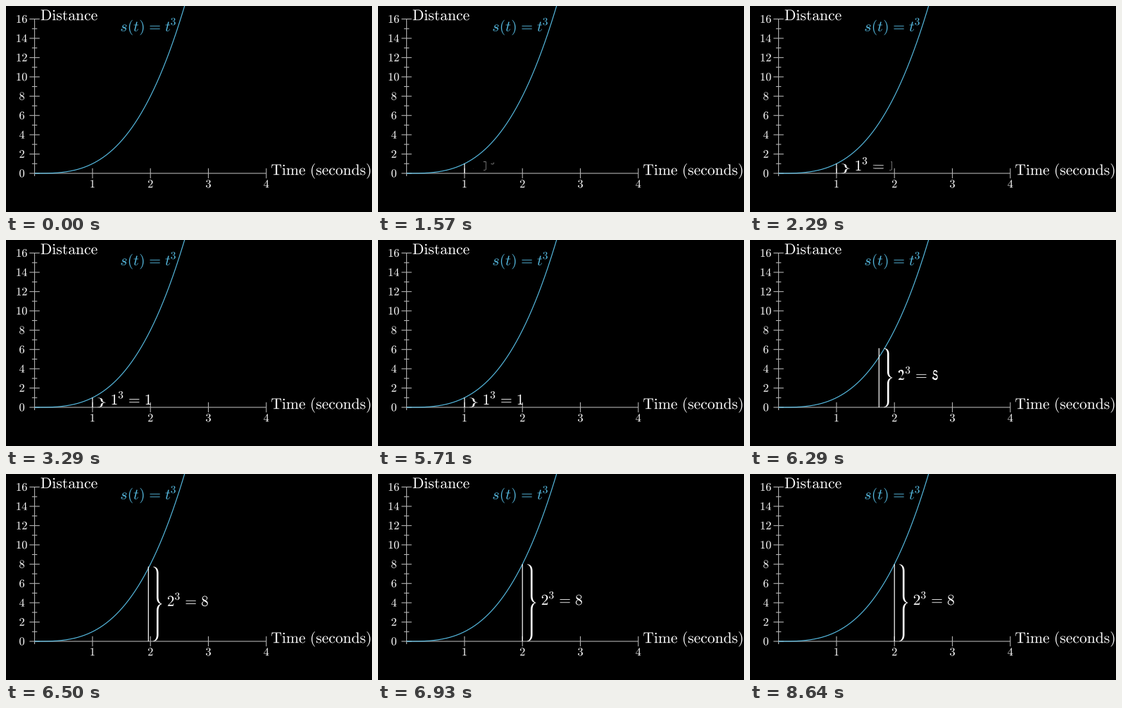
A matplotlib script that plays this animation: 520 by 293 pixels, repeating every 10 s.

```python
import matplotlib.pyplot as plt
import numpy as np
from matplotlib.animation import FuncAnimation
from matplotlib.patches import PathPatch
from matplotlib.path import Path
from matplotlib.textpath import TextPath

plt.rcParams["mathtext.fontset"] = "cm"

W, H, DPI = 520, 293, 100
FRAMES, LOOP = 140, 10000
UNIT = 36.58                       # pixels per scene unit
X0, Y0 = 40.6, 238.0               # graph origin
DX, DY = 2.25 * UNIT, 6 / 16 * UNIT
EM, SMALL = 21.6, 16.4             # text sizes in pixels
WHITE, GREY, BLUE = "#ffffff", "#b4b4b4", "#55b8de"
GROW, WRITE, MOVE = 0.286, 1.286, 5.686   # start times in seconds

fig = plt.figure(figsize=(W / DPI, H / DPI), dpi=DPI, facecolor="black")
ax = fig.add_axes([0, 0, 1, 1])
ax.set(xlim=(0, W), ylim=(H, 0))
ax.axis("off")


def gx(t):
    return X0 + DX * t


def gy(s):
    return Y0 - DY * s


def lerp(a, b, u):
    return a + (b - a) * u


def smooth(u):
    """Sigmoid easing, clamped to 0..1."""
    u = np.clip(u, 0, 1)
    e = 1 / (1 + np.exp(5))
    s = 1 / (1 + np.exp(-10 * (u - 0.5)))
    return float(np.clip((s - e) / (1 - 2 * e), 0, 1))


def stroke(xs, ys, color, width=1.1, z=1):
    line, = ax.plot(xs, ys, color=color, lw=width * 72 / DPI, zorder=z,
                    solid_capstyle="butt", snap=False)
    return line


def outline(tex):
    """Glyph contours in em units, y down, starting at the left ink edge."""
    polys = TextPath((0, 0), f"${tex}$", size=200).to_polygons()
    left = min(p[:, 0].min() for p in polys)
    return [(p - [left, 0]) * [1 / 200, -1 / 200] for p in polys]


def compound(polys):
    return Path.make_compound_path(*[Path(p) for p in polys])


def patch(polys, color, z=3, **kw):
    style = dict(fc=color, ec="none", lw=0, snap=False, zorder=z)
    style.update(kw)
    return ax.add_patch(PathPatch(compound(polys), **style))


def text(tex, x, y, size=EM, color=WHITE, center=False):
    polys = outline(tex)
    if center:
        x -= max(p[:, 0].max() for p in polys) * size / 2
    patch([p * size + [x, y] for p in polys], color)


# Axes
stroke([X0, gx(4)], [Y0, Y0], GREY)
stroke([X0, X0], [Y0 + 4, gy(16)], GREY)
for s in range(17):
    r = 3.7 if s % 2 else 7.2
    stroke([X0 - r, X0 + r], [gy(s)] * 2, GREY)
    if s % 2 == 0:
        text(rf"\mathrm{{{s}}}", 22.6, gy(s) + 5.3, SMALL, center=True)
for t in range(1, 5):
    stroke([gx(t)] * 2, [Y0 - 7.2, Y0 + 7.2], GREY)
    text(rf"\mathrm{{{t}}}", gx(t), 258.3, SMALL, center=True)
text(r"\mathrm{Distance}", 49.6, 20.3)
text(r"\mathrm{Time\ (seconds)}", 377.2, 240.2)

# Curve and its formula
ts = np.linspace(0, 2.7, 300)
stroke(gx(ts), gy(ts ** 3), BLUE, 1.2, z=2)
for tex, x in [("s", 163.5), ("(", 174.8), ("t", 181.5), (")", 190.4),
               ("=", 204.4), ("t", 226.5)]:
    text(tex, x, 36, color=BLUE)
text("3", 234.4, 36 - 0.413 * EM, 0.71 * EM, BLUE)


def bezier(a, b, c, d, n=16):
    u = np.linspace(0, 1, n)[:, None]
    a, b, c, d = map(np.array, (a, b, c, d))
    return ((1 - u) ** 3 * a + 3 * u * (1 - u) ** 2 * b
            + 3 * u * u * (1 - u) * c + u ** 3 * d)


def brace(height, hook):
    """Right-pointing brace centred on y = 0, x from 0 to 12."""
    top, k, n = -height / 2, hook / 10, -hook
    outer = np.vstack([
        bezier((0, top), (4.5, top + 0.4 * k), (7.3, top + hook * 0.35),
               (7.3, top + hook)),
        bezier((7.3, n), (7.3, n * 0.5), (9, -k), (12, -0.35 * k))])
    inner = np.vstack([
        bezier((0, top + 0.7 * k), (3, top + 1.3 * k),
               (4.7, top + hook * 0.5), (4.7, top + hook)),
        bezier((4.7, n), (4.7, n * 0.4), (7, -0.8 * k), (10.6, 0))])
    flip = [1, -1]
    return np.vstack([outer, outer[::-1] * flip, inner * flip, inner[::-1]])


BRACES = brace(DY, 3.3), brace(8 * DY, 10)


def resample(poly, n=160):
    d = np.r_[0, np.cumsum(np.hypot(*np.diff(poly, axis=0).T))]
    u = np.linspace(0, d[-1], n)
    return np.c_[np.interp(u, d, poly[:, 0]), np.interp(u, d, poly[:, 1])]


def contours(tex, size):
    return [resample(p * size) for p in outline(tex)]


def match(a, b):
    """Pad the shorter contour list with points so both can be blended."""
    mid = np.vstack(a).min(0) / 2 + np.vstack(a).max(0) / 2
    return a + [np.tile(mid, (len(p), 1)) for p in b[len(a):]], b


class Glyph:
    def __init__(self, first, last, x, rise, size, delay):
        a, b = contours(first[0], size), contours(last[0], size)
        shift = [[x + first[1], -rise], [x + last[1], -rise]]
        a, b = match(a, b)
        self.ends = [p + shift[0] for p in a], [p + shift[1] for p in b]
        self.delay = delay
        self.fill = patch(self.ends[0], WHITE, 5)
        self.edge = patch(self.ends[0], "none", 6, ec=WHITE)

    def update(self, t, m, pos):
        p = float(np.clip((t - WRITE - self.delay) / 0.95, 0, 1))
        polys = [lerp(a, b, m) + pos for a, b in zip(*self.ends)]
        drawn, filled = smooth(min(2 * p, 1) * 0.75 + 0.125), max(2 * p - 1, 0)
        self.fill.set_visible(filled > 0)
        self.edge.set_visible(0 < p < 1)
        self.fill.set_path(compound(polys))
        self.fill.set_alpha(smooth(filled))
        n = max(2, int(drawn * len(polys[0])))
        self.edge.set_path(compound([q[:n] for q in polys]))
        self.edge.set_linewidth(0.45 * (1 - filled))
        self.edge.set_alpha(0.7)


ONE, SUP = 1.0, 0.71 * EM
glyphs = [
    Glyph(("1", 0), ("2", 0), 0, 0, EM, 0),
    Glyph(("3", -ONE), ("3", 0), 10.4, 0.413 * EM, SUP, 0.1),
    Glyph(("=", -ONE), ("=", 0), 25.7, 0, EM, 0.55),
    Glyph(("1", 0), ("8", 0), 48.2, 0, EM, 0.8),
]
bar = stroke([], [], WHITE, 1.2, z=4)
hug = patch([BRACES[0]], WHITE, 4)


def draw(i):
    t = i * LOOP / FRAMES / 1000
    up, grown, m = smooth(t - GROW), smooth(t - WRITE), smooth(t - MOVE)
    x, s = gx(lerp(1, 2, m)), lerp(1, 8, m)
    mid = gy(s / 2)

    bar.set_data([x, x], [Y0, gy(s * up)])
    bar.set_visible(up > 0)

    shape = lerp(*BRACES, m) - [6, 0]
    hug.set_path(Path(shape * grown + [x + 13, mid]))
    hug.set_visible(grown > 0)

    for g in glyphs:
        g.update(t, m, [x + 27.5, mid + 3])
    return [bar, hug]


anim = FuncAnimation(fig, draw, frames=FRAMES, interval=LOOP / FRAMES,
                     init_func=lambda: draw(0), repeat=True, repeat_delay=0,
                     blit=False)
plt.show()
```
